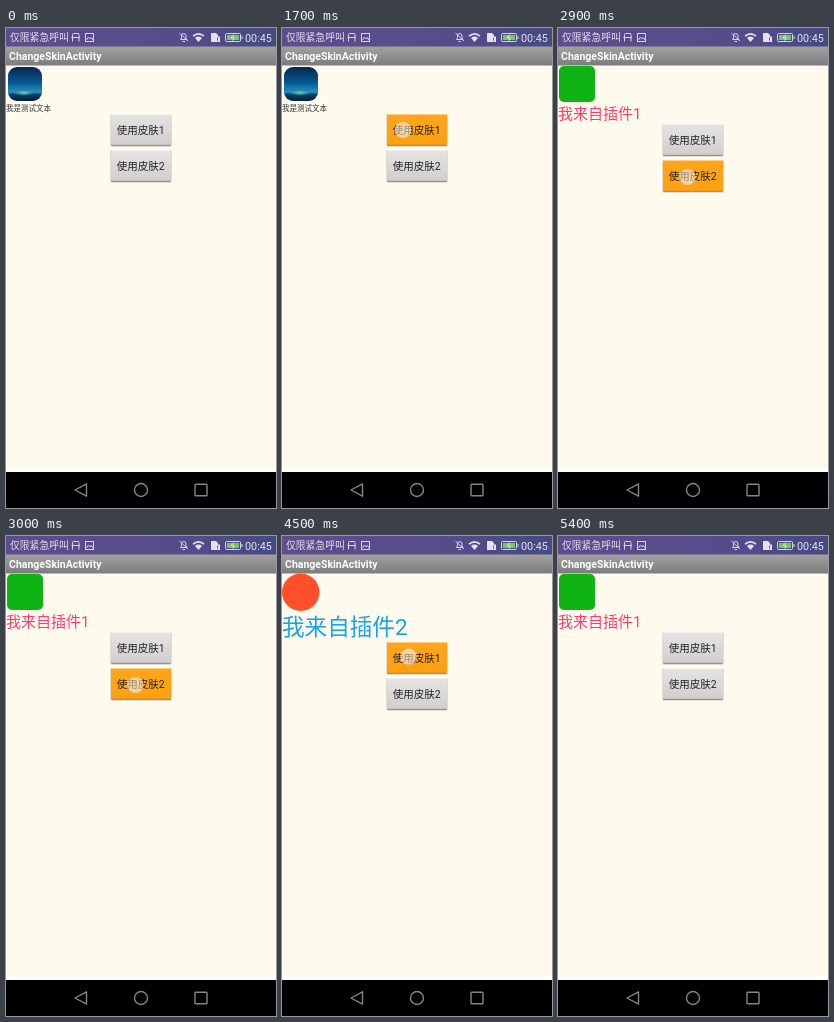
Recreate the animation shown at these times as an HTML page. Size 270 by 480 pixels, loop 6000 ms.

```html
<!DOCTYPE html>
<html lang="zh-CN">
<head>
<meta charset="utf-8">
<style>
html, body { margin: 0; width: 100%; height: 100%; overflow: hidden; background: #000; }
svg { display: block; width: 270px; height: 480px; }
text { font-family: Roboto, "Noto Sans CJK SC", "Noto Sans CJK", sans-serif; }
.line { fill: none; stroke: #d9d5e8; stroke-width: 1; }
.nav { fill: none; stroke: #858585; stroke-width: 1.4; stroke-linejoin: round; }
</style>
</head>
<body>
<svg viewBox="0 0 270 480">
  <defs>
    <linearGradient id="status"><stop stop-color="#5d4d8c"/><stop offset=".6" stop-color="#574c8b"/><stop offset="1" stop-color="#454a82"/></linearGradient>
    <linearGradient id="title" x2="0" y2="1"><stop stop-color="#a2a2a2"/><stop offset="1" stop-color="#7c7c7c"/></linearGradient>
    <linearGradient id="idle" x2="0" y2="1"><stop stop-color="#e5e4e2"/><stop offset="1" stop-color="#d0cfcd"/></linearGradient>
    <linearGradient id="pressed" x2="0" y2="1"><stop stop-color="#ffa51c"/><stop offset="1" stop-color="#ffa010"/></linearGradient>
    <linearGradient id="sky" x2="0" y2="1">
      <stop stop-color="#062650"/><stop offset=".45" stop-color="#07568f"/><stop offset=".74" stop-color="#2292bd"/>
      <stop offset=".8" stop-color="#0a4468"/><stop offset="1" stop-color="#041c38"/>
    </linearGradient>
    <radialGradient id="glow"><stop stop-color="#b9d9b8" stop-opacity=".8"/><stop offset="1" stop-color="#4bb0cf" stop-opacity="0"/></radialGradient>
    <g id="plain"><rect x="2" y="39" width="34" height="34" rx="9" fill="url(#sky)"/><ellipse cx="18" cy="65" rx="11" ry="3" fill="url(#glow)"/></g>
    <rect id="green" x="1" y="38" width="36" height="36" rx="5" fill="#0fb313"/>
    <circle id="red" cx="18.7" cy="56.3" r="18.7" fill="#ff4f2b"/>
  </defs>

  <rect width="270" height="480" fill="#000"/>
  <rect y="37" width="270" height="407" fill="#fffaee"/>
  <rect y="440" width="270" height="4" fill="#fffdf8"/>
  <rect width="270" height="19" fill="url(#status)"/>
  <rect y="18.5" width="270" height="19" fill="url(#title)"/>
  <text x="3" y="32" font-size="10.5" font-weight="700" fill="#fff">ChangeSkinActivity</text>

  <g fill="#e5e1f0">
    <text x="4" y="13.3" font-size="9.8" font-weight="500">仅限紧急呼叫</text>
    <text x="239" y="13.6" font-size="10.8">00:45</text>
    <path d="M186.5 7.5Q192.500 2.500 198.500 7.500L197.400 8.800Q192.500 4.900 187.600 8.800ZM189 10Q192.500 7.200 196 10L192.500 14Z"/>
    <path d="M205 5h5l2 2v2h-2v5h-5Z"/>
    <rect x="209" y="8.500" width="5" height="5.500"/>
  </g>
  <path d="M211.500 9.700v2M211.500 12.500v.8" stroke="#50498a"/>
  <g class="line">
    <path d="M66.500 9V6.500Q66.500 5.500 67.500 5.500H72Q73 5.500 73 6.500V9M65.500 9.500H74M66.500 10V13.500M73 10V13.500"/>
    <rect x="79.500" y="5.500" width="8" height="8"/>
    <path d="M80.500 12l2-3 1.700 2 1.300-1.500 1.500 2.500"/>
    <path d="M174.500 11.500h6.500l-1-1.700V8q0-2.500-2.300-2.500T175.500 8v1.800ZM176.500 13.500h2.500M173.500 5l8.500 8"/>
    <rect x="219.500" y="5.500" width="15" height="8" rx="1"/>
    <path d="M236 8v3"/>
  </g>
  <rect x="221" y="7" width="12" height="5" fill="#78c85a"/>
  <path d="M227.600 6.500l-2.300 3.300h3l-1.500 3" fill="none" stroke="#f2f7ed" stroke-width=".8"/>

  <use id="icon"/>
  <text id="label" x="0"></text>
  <g id="buttons"></g>
  <g id="touch">
    <circle r="8" fill="#fff" fill-opacity=".5"/>
    <circle r="7.500" fill="none" stroke="#d0d0d0" stroke-opacity=".6"/>
  </g>

  <g class="nav">
    <path d="M80.500 455.800V468.200L69 462Z"/>
    <circle cx="135" cy="462" r="6.500"/>
    <rect x="189" y="456.200" width="12" height="11.600" rx=".8"/>
  </g>
</svg>
<script>
const $ = id => document.getElementById(id);
const skins = [
  { icon: '#plain', text: '我是测试文本', size: 7.5, base: 83, color: '#333', top: 86 },
  { icon: '#green', text: '我来自插件1', size: 15, base: 91.3, color: '#ff3b70', top: 96 },
  { icon: '#red', text: '我来自插件2', size: 22.6, base: 99.3, color: '#16a5e6', top: 106 }
];
const taps = [
  { at: 1600, x: 121, y: 102, button: 0 },
  { at: 2800, x: 129.5, y: 149, button: 1 },
  { at: 4400, x: 126.5, y: 120.5, button: 0 }
];
const pressDelay = 100, tapLength = 300;

const button = (y, n) => `<g transform="translate(105 ${y})">
  <rect x="-.5" y="0" width="61" height="32.500" rx="1.500" fill="#8d8a85" fill-opacity=".55"/>
  <rect class="face" width="60" height="31" rx="1"/>
  <path d="M.5 .5H59.500" stroke="#fff" stroke-opacity=".45"/>
  <path d="M.5 31.300H59.500" stroke="#777" stroke-opacity=".7"/>
  <text x="5.700" y="20" font-size="10.5" fill="#222">使用皮肤${n}</text></g>`;
$('buttons').innerHTML = button(0, 1) + button(36, 2);
const faces = document.querySelectorAll('.face');

function set(el, attrs) {
  for (const key in attrs) el.setAttribute(key, attrs[key]);
}

function draw(time) {
  const done = taps.filter(tap => time >= tap.at + tapLength).pop();
  const skin = skins[done ? done.button + 1 : 0];
  const tap = taps.find(tap => time >= tap.at && time < tap.at + tapLength);
  set($('icon'), { href: skin.icon });
  set($('label'), { y: skin.base, 'font-size': skin.size, fill: skin.color });
  $('label').textContent = skin.text;
  set($('buttons'), { transform: `translate(0 ${skin.top})` });
  faces.forEach((face, i) => {
    const down = tap && tap.button === i && time >= tap.at + pressDelay;
    set(face, { fill: down ? 'url(#pressed)' : 'url(#idle)' });
  });
  set($('touch'), { visibility: tap ? 'visible' : 'hidden' });
  if (tap) set($('touch'), { transform: `translate(${tap.x} ${tap.y})` });
}

const start = performance.now();
function tick() {
  draw((performance.now() - start) % 6000);
  requestAnimationFrame(tick);
}
tick();
</script>
</body>
</html>
```
